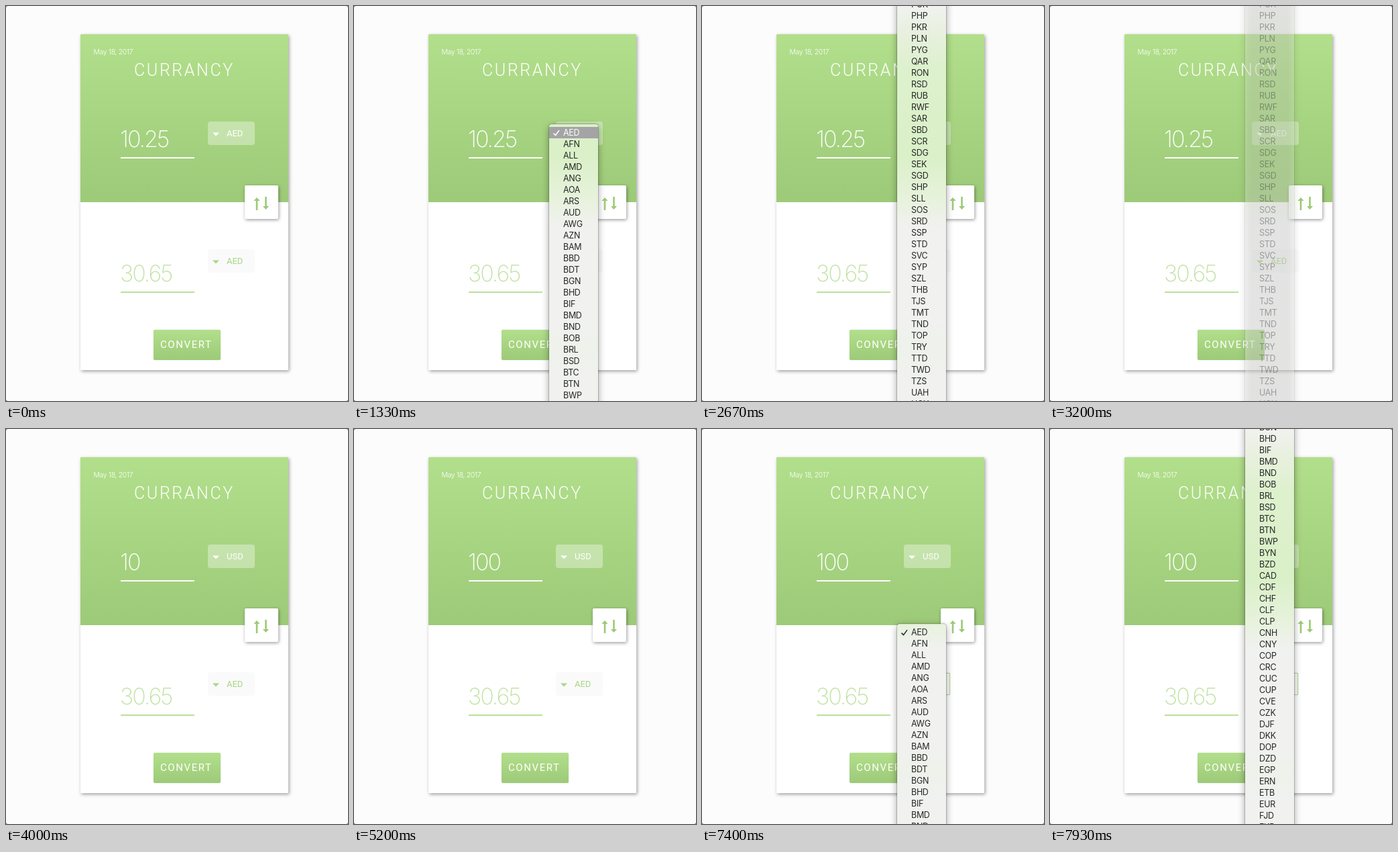
An HTML page with a canvas that plays this animation: 510x588 px, repeating every 8000 ms.

```html
<!DOCTYPE html>
<html lang="en">
<head>
<meta charset="utf-8">
<title>Currency converter</title>
<style>
  html, body { margin: 0; width: 100%; height: 100%; overflow: hidden; background: #fcfcfc; }
  canvas { display: block; }
</style>
</head>
<body>
<canvas id="stage" width="510" height="588"></canvas>
<script>
const W = 510, H = 588, LOOP = 8000, ROW = 17;
const ctx = document.getElementById('stage').getContext('2d');

const CODES = (
  'AED AFN ALL AMD ANG AOA ARS AUD AWG AZN BAM BBD BDT BGN BHD BIF BMD BND BOB BRL BSD BTC BTN BWP ' +
  'BYN BZD CAD CDF CHF CLF CLP CNH CNY COP CRC CUC CUP CVE CZK DJF DKK DOP DZD EGP ERN ETB EUR FJD ' +
  'FKP GBP GEL GGP GHS GIP GMD GNF GTQ GYD HKD HNL HRK HTG HUF IDR ILS IMP INR IQD IRR ISK JEP JMD ' +
  'JOD JPY KES KGS KHR KMF KPW KRW KWD KYD KZT LAK LBP LKR LRD LSL LYD MAD MDL MGA MKD MMK MNT MOP ' +
  'MRO MUR MVR MWK MXN MYR MZN NAD NGN NIO NOK NPR NZD OMR PAB PEN PGK PHP PKR PLN PYG QAR RON RSD ' +
  'RUB RWF SAR SBD SCR SDG SEK SGD SHP SLL SOS SRD SSP STD SVC SYP SZL THB TJS TMT TND TOP TRY TTD ' +
  'TWD TZS UAH UGX USD UYU UZS'
).split(' ');

// Each menu: opening time, scroll span, fade span, first row centre, code that ends up on top
const MENUS = [
  { open: 530, scroll: [1400, 2600], fade: [3070, 3280], y: 188.5, top: 'PHP' },
  { open: 6000, scroll: [7250, 7930], fade: [LOOP, LOOP + 200], y: 378.5, top: 'BHD' }
];

const TYPING = [
  [0, '10.25'], [3800, '10.2'], [3930, '10.'], [4000, '10'], [4130, '1'],
  [4200, ''], [4330, '1'], [4530, '10'], [4670, '100']
];

const progress = (t, [a, b]) => Math.min(1, Math.max(0, (t - a) / (b - a)));
const smooth = p => p * p * (3 - 2 * p);

function gradient(y0, y1, stops) {
  const g = ctx.createLinearGradient(0, y0, 0, y1);
  stops.forEach(([at, color]) => g.addColorStop(at, color));
  return g;
}
const green = (y0, y1) => gradient(y0, y1, [[0, '#b2df8b'], [1, '#9dca78']]);

const vibrancy = gradient(0, H, [
  [0, '#f1f2ef'], [.07, '#e8f0de'], [.16, '#ddf1cd'], [.38, '#daf0c8'], [.48, '#e6f2da'],
  [.56, '#f1f1f0'], [.8, '#f1f1f0'], [.86, '#eef2ea'], [.95, '#f1f1f0'], [1, '#f1f1f0']
]);

function box(x, y, w, h, r, fill, shadow) {
  ctx.save();
  if (shadow) {
    [ctx.shadowOffsetX, ctx.shadowOffsetY, ctx.shadowBlur, ctx.shadowColor] = shadow;
  }
  ctx.fillStyle = fill;
  ctx.beginPath();
  ctx.roundRect(x, y, w, h, r);
  ctx.fill();
  ctx.restore();
}

function poly(fill, ...points) {
  ctx.fillStyle = fill;
  ctx.beginPath();
  points.forEach(([x, y]) => ctx.lineTo(x, y));
  ctx.fill();
}

function text(str, x, y, font, color, spacing = 0) {
  ctx.font = font + ', sans-serif';
  ctx.letterSpacing = spacing + 'px';
  ctx.fillStyle = color;
  ctx.fillText(str, x, y);
}

function amount(str, y, color, line) {
  text(str, 170, y, '200 34px Inter', color, -2);
  box(171, y + 15, 110, 2, 0, line);
}

function select(code, y, fill, color) {
  box(301, y, 70, 35, 4, fill);
  poly(color, [308, y + 16.5], [318, y + 16.5], [313, y + 21.5]);
  text(code, 329, y + 22, '400 13px Roboto', color);
}

// dir is -1 for up, 1 for down
function arrow(x, y, dir) {
  const tip = y + dir * 9.5, neck = tip - dir * 5;
  ctx.fillStyle = '#9bca73';
  ctx.fillRect(x - 1.3, y - 9.5 + (dir < 0 ? 3 : 0), 2.6, 16);
  poly('#9bca73', [x, tip], [x - 4.5, neck], [x + 4.5, neck]);
}

function menu(m, t) {
  const alpha = 1 - progress(t, m.fade);
  if (t < m.open || !alpha) return;
  const end = 14.5 - ROW * CODES.indexOf(m.top);
  const p = smooth(progress(t, m.scroll));
  let first = m.y + (end - m.y) * p;
  // once the list fills the screen it moves by whole rows
  if (first < 14.5) first = 14.5 + Math.round((first - 14.5) / ROW) * ROW;

  const top = Math.max(first - 12.5, -20);
  ctx.globalAlpha = alpha;
  box(291, top, 73, H + 30 - top, 4, vibrancy, [0, 3, 11, 'rgba(0,0,0,.38)']);
  ctx.strokeStyle = 'rgba(0,0,0,.18)';
  ctx.lineWidth = 1;
  ctx.beginPath();
  ctx.roundRect(290.5, top - .5, 74, H + 30 - top, 4);
  ctx.stroke();

  const active = p === 0;
  if (active) box(291, first - 8.5, 73, ROW, 0, '#a4a4a7');
  CODES.forEach((code, i) => {
    const y = first + i * ROW;
    if (y < -12 || y > H + 12) return;
    text(code, 312, y + 4.5, '400 12.5px Inter', active && !i ? '#fff' : '#252825', -.3);
  });
  if (first > -12) {
    ctx.strokeStyle = active ? '#fff' : '#252825';
    ctx.lineWidth = 1.5;
    ctx.beginPath();
    ctx.moveTo(297.5, first + 1);
    ctx.lineTo(300.5, first + 4);
    ctx.lineTo(306, first - 3.5);
    ctx.stroke();
  }
  ctx.globalAlpha = 1;
}

function draw(t) {
  ctx.fillStyle = '#666';
  ctx.fillRect(0, 0, W, H);
  box(0, 0, W, H, 3, '#fcfcfc');

  box(111, 42, 310, 500, 1, '#fff', [1.5, 2, 5, 'rgba(0,0,0,.36)']);
  box(111, 42, 310, 250, [1, 1, 0, 0], green(42, 292));
  text('May 18, 2017', 130.5, 72, '300 10.5px Inter', '#fff', -.35);
  text('CURRANCY', 191, 104, '300 25px Roboto', '#fff', 2.6);

  amount(TYPING.findLast(([at]) => t >= at)[1], 210, '#fff', '#fff');
  select(t < 3470 ? 'AED' : 'USD', 172, 'rgba(255,255,255,.35)', '#fff');

  box(356, 267, 50, 50, 2, '#fff', [1, 1.5, 5, 'rgba(0,0,0,.4)']);
  arrow(374, 294.5, -1);
  arrow(387.5, 293.5, 1);

  amount('30.65', 410, '#c2e3a5', '#bbe09a');
  select('AED', 362, '#fafafa', '#a9d686');
  if (t >= MENUS[1].open) {
    ctx.strokeStyle = '#acd98a';
    ctx.lineWidth = 1;
    ctx.strokeRect(302.5, 363.5, 67, 32);
  }

  box(220, 482, 100, 45, 2, green(482, 527), [0, 0, 2, 'rgba(0,0,0,.12)']);
  text('CONVERT', 230, 508.5, '400 15px Roboto', '#fff', 1.6);

  MENUS.forEach(m => menu(m, t));
}

const start = performance.now();
function tick() {
  draw((performance.now() - start) % LOOP);
  requestAnimationFrame(tick);
}
tick();
</script>
</body>
</html>
```
